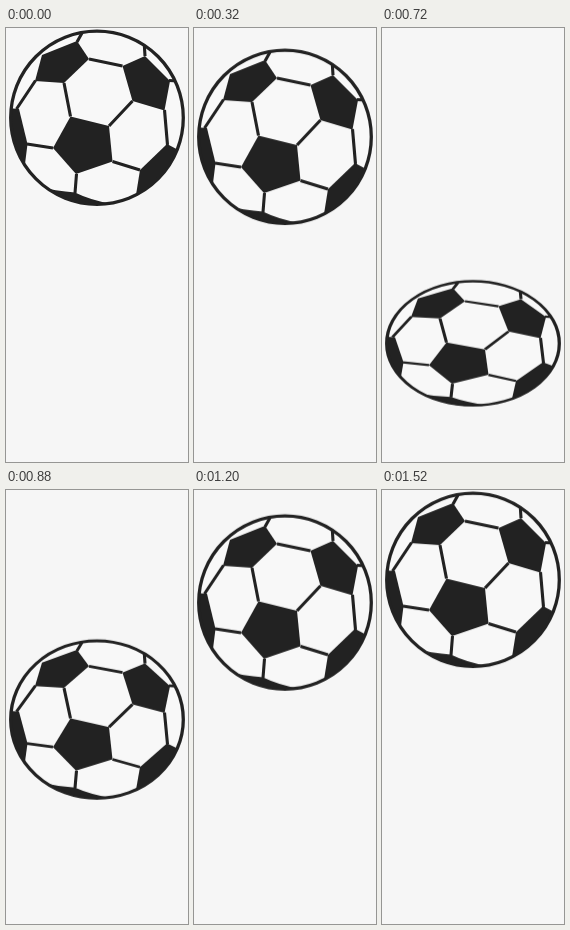
An HTML page for the animation above (1560 ms loop, 182 by 434 pixels).

```html
<!DOCTYPE html>
<html lang="en">
<head>
<meta charset="utf-8">
<title>Bouncing ball</title>
<style>
  html, body { margin: 0; width: 100%; height: 100%; overflow: hidden; background: #f6f6f6; }
  svg { display: block; width: 182px; height: 434px; }

  /* Pinned at the ball's lowest point, so the squash happens against the floor. */
  .ball {
    transform-box: view-box;
    transform-origin: 91px 178px;
    animation: bounce 1560ms infinite;
  }
  .skin { fill: #f8f8f8; }
  .ink { fill: #222; }
  .seams { fill: none; stroke: #222; stroke-width: 3.1; stroke-linejoin: round; }
  .rim { fill: none; stroke: #222; stroke-width: 3.3; }

  @keyframes bounce {
    0%      { transform: translateY(0) scaleY(1); animation-timing-function: cubic-bezier(.45, 0, .75, .36); }
    30.769% { transform: translateY(51.5px) scaleY(1); animation-timing-function: cubic-bezier(.33, .27, .67, .61); }
    35.897% { transform: translateY(79px) scaleY(1); animation-timing-function: cubic-bezier(.33, .27, .67, .48); }
    42.564% { transform: translateY(132.6px) scaleY(.908); animation-timing-function: cubic-bezier(.33, .22, .67, .64); }
    46.154% { transform: translateY(199.3px) scaleY(.721); animation-timing-function: cubic-bezier(.33, .45, .67, .9); }
    49.487% { transform: translateY(256px) scaleY(.6); animation-timing-function: cubic-bezier(.33, .1, .67, .55); }
    52.821% { transform: translateY(199.3px) scaleY(.721); animation-timing-function: cubic-bezier(.33, .36, .67, .78); }
    56.41%  { transform: translateY(132.6px) scaleY(.908); animation-timing-function: cubic-bezier(.33, .52, .67, .73); }
    63.077% { transform: translateY(79px) scaleY(1); animation-timing-function: cubic-bezier(.33, .39, .67, .73); }
    68.205% { transform: translateY(51.5px) scaleY(1); animation-timing-function: cubic-bezier(.25, .62, .55, 1); }
    98.974%, 100% { transform: translateY(0) scaleY(1); }
  }
</style>
</head>
<body>
<svg viewBox="0 0 182 434">
  <defs>
    <clipPath id="disc"><ellipse cx="91" cy="89.7" rx="87" ry="87.3"/></clipPath>
  </defs>
  <g class="ball">
    <g clip-path="url(#disc)">
      <path class="skin" d="M0 0 H182 V180 H0 Z"/>
      <g class="ink">
        <path d="M36 27 L71 13 L83 31 L58 55 L29 53 Z"/>
        <path d="M139 28 L164 53 L158.5 82.5 L126.5 73 L116.5 38 Z"/>
        <path d="M64.5 88.5 L103 98 L106.5 133.5 L70 146 L47 120 Z"/>
        <path d="M0 80 L13 81 L21.5 116 L19 136 L0 140 Z"/>
        <path d="M161 116 L182 127 L160 178 L129.5 170 L134 142 Z"/>
        <path d="M30 158 Q50 163 69 164.5 Q84 172 106 176 L90 182 L40 180 Z"/>
      </g>
      <path class="seams" d="M71 14 L76 5 M83 31 L116.5 38 M58 55 L64.5 88.5 M29.5 52.5 L10.5 81
        M126.5 73 L103 98 M139 28 L138 12 M163 52.5 L172 53 M158.5 82 L161.5 117
        M106.5 133.5 L134 142 M47 120 L21 116 M70.5 146 L69 165"/>
    </g>
    <ellipse class="rim" cx="91" cy="89.7" rx="86.3" ry="86.6"/>
  </g>
</svg>
</body>
</html>
```
